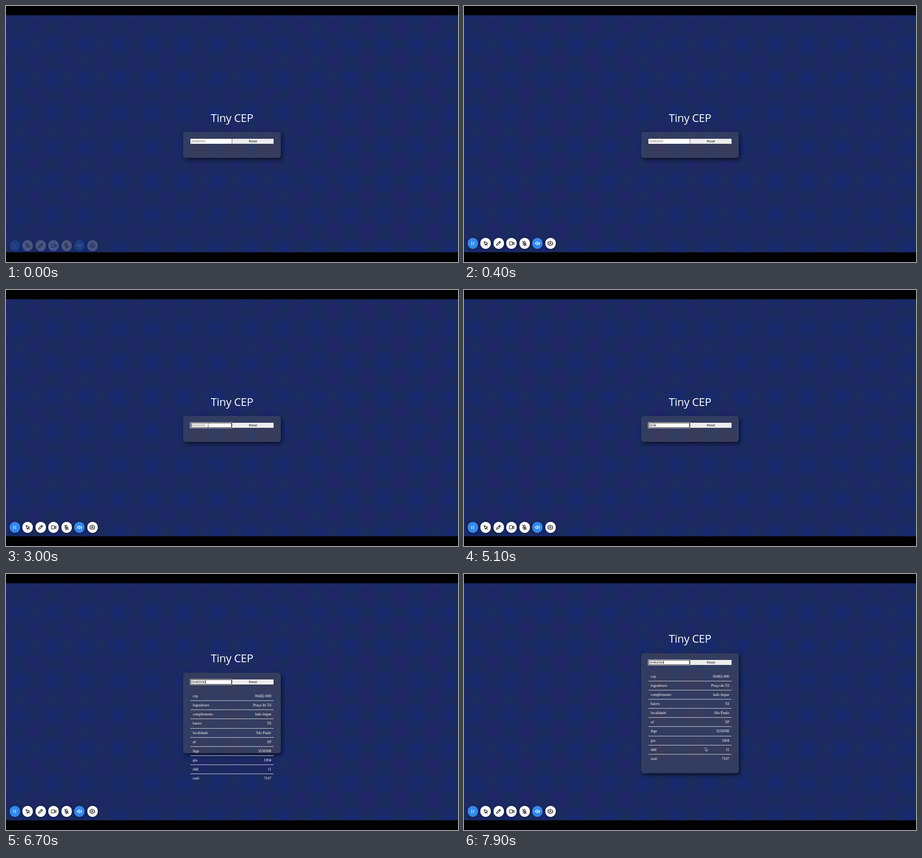
An HTML page that plays this animation: 995 px wide and 563 px high, repeating every 8000 ms.

```html
<!DOCTYPE html>
<html lang="pt">
<head>
<meta charset="utf-8">
<title>Tiny CEP</title>
<style>
  html, body { margin: 0; width: 100%; height: 100%; overflow: hidden; background: #000; }
  div, svg, span { position: absolute; box-sizing: border-box; }
  #stage { left: 0; top: 0; width: 995px; height: 563px; overflow: hidden; }
  #wall {
    inset: 0; clip-path: inset(20.5px 0 21.5px);
    background:
      radial-gradient(closest-side, #20246a, #20246a00) 28.5px 7.5px / 73px 75px,
      radial-gradient(closest-side, #172872, #17287200) -8.5px 47.5px / 73px 75px,
      #1b2d59;
  }
  #card {
    left: 390px; width: 215px; border-radius: 6px;
    background:
      radial-gradient(closest-side, #50374659, #50374600) 28.5px -22.5px / 73px 75px fixed,
      #313d62;
    box-shadow: 3px 4px 8px #0009;
  }
  #title {
    left: 0; width: 100%; top: -46.5px; text-align: center; color: #fff; white-space: nowrap;
    font: 24.3px/30px "Open Sans", sans-serif; letter-spacing: -.4px;
  }
  #field, #reset { top: 15px; height: 11px; font: 6.95px/11px "Liberation Sans", Arial, sans-serif; }
  #field { left: 16px; width: 91px; background: #fff; white-space: nowrap; }
  #field.focus { box-shadow: inset 0 0 0 1px #101010, 0 0 0 1px #e8e8f0; }
  #text { left: 1.8px; top: 0; }
  #caret { top: 2px; width: 1px; height: 7px; background: #222; }
  #reset {
    left: 107px; width: 92px; background: #ededee; color: #111; text-align: center;
    border-left: 1px solid #6d6d74;
  }
  .row {
    left: 16px; width: 183px; height: 20.15px; padding: 0 5px; color: #fff;
    border-bottom: 1px solid #d5d8e2; font: 8.3px/19.6px "Liberation Serif", Times, serif;
    display: flex; justify-content: space-between;
  }
  .row:last-child { border: 0; }
  .row span { position: static; }
  .tool { top: 510.4px; width: 23.4px; height: 23.4px; border-radius: 50%; background: #fff; box-shadow: 0 1px 6px #0006; }
  .tool.on { background: #3388ea; }
  .tool svg { left: 5.7px; top: 5.7px; width: 12px; height: 12px; }
  .tool path { fill: none; stroke: #111; stroke-width: 2.2; stroke-linejoin: round; stroke-linecap: round; }
  .tool.on path { stroke: #fff; }
  #bar { inset: 0; }
  #arrow, #beam { left: 0; top: 0; overflow: visible; }
</style>
</head>
<body>
<div id="stage">
  <div id="wall"></div>
  <div id="card">
    <div id="title">Tiny CEP</div>
    <div id="field"><span id="text"></span><div id="caret"></div></div>
    <div id="reset">Reset</div>
    <div id="rows"></div>
  </div>
  <div id="bar"></div>
  <svg id="arrow" width="8" height="12"><path d="M0 0V8L1.9 6.4L3.2 9.2L4.4 8.7L3.1 5.9H5.6Z" fill="#1b2140" stroke="#e4e6ee" stroke-width=".8"/></svg>
  <svg id="beam" width="6" height="10"><path d="M-1.5 -4H1.5M0 -4V4M-1.5 4H1.5" fill="none" stroke="#333" stroke-width=".8"/></svg>
</div>
<script>
const $ = id => document.getElementById(id);
const LOOP = 8000, STEP = 100;
const CODE = '00482000';
const KEY_TIMES = [4000, 4100, 4400, 4600, 5200, 5600, 5800, 6400];
const CARET_OFF = [[2500, 3000], [3600, 4000], [5100, 5200], [6300, 6400], [7000, 7500]];
const DIGIT = 6.95 * .556;

// Keyframes: [time, ...values]
const GROWTH = [[6400, 0], [6500, .06], [6600, .27], [6700, .58], [6999, .58], [7000, 1]];
const ENTER = [[1100, 522, 470], [1200, 498, 415], [1300, 478, 368], [1400, 463, 337.5],
               [1500, 453, 314], [1600, 447, 301], [1700, 445, 296.5]];
const RETURN = [[7800, 538, 394], [7900, 531, 381]];

const DATA = [
  ['cep', '00482-000'], ['logradouro', 'Praça do Til'], ['complemento', 'lado ímpar'],
  ['bairro', 'Til'], ['localidade', 'São Paulo'], ['uf', 'SP'], ['ibge', '3550308'],
  ['gia', '1004'], ['ddd', '11'], ['siafi', '7107']
];
$('rows').innerHTML = DATA.map(([key, value], i) =>
  `<div class="row" style="top:${42 + i * 20.15}px"><span>${key}</span><span>${value}</span></div>`).join('');

const ICONS = [
  'M8 5V19M16 5V19',
  'M4 4L10 21L13 14L20 11ZM13 14L20 21',
  'M3 21L4 16L17 3L21 7L8 20ZM14 6L18 10',
  'M2 5H15V19H2ZM15 11L22 7V17L15 13',
  'M9 5Q9 2 12 2T15 5V11Q15 14 12 14T9 11ZM5 11Q5 18 12 18T19 11M12 18V22M8 22H16M3 3L21 21',
  'M2 9H6L11 5V19L6 15H2ZM15 9Q18 12 15 15M18 5Q24 12 18 19',
  'M10 2H14L15 5L18 6L21 6L23 10L20 12L23 15L21 19L17 18L15 20L14 22H10L9 19L6 18L3 19L1 15L4 12L1 9L3 5L7 6L9 5ZM12 9A3 3 0 1 1 11.9 9'
];
$('bar').innerHTML = ICONS.map((d, i) =>
  `<div class="tool ${i === 0 || i === 5 ? 'on' : ''}" style="left:${7.6 + i * 28.5}px">
    <svg viewBox="0 0 24 24"><path d="${d}"/></svg></div>`).join('');

function sample(keys, t) {
  const next = keys.findIndex(k => k[0] > t);
  if (next === 0) return keys[0].slice(1);
  if (next < 0) return keys[keys.length - 1].slice(1);
  const a = keys[next - 1], b = keys[next], p = (t - a[0]) / (b[0] - a[0]);
  return a.slice(1).map((v, i) => v + (b[i + 1] - v) * p);
}

const show = (id, visible) => $(id).style.display = visible ? '' : 'none';

function draw(t) {
  const fade = Math.min(1, t / 400);
  $('bar').style.opacity = .2 + .8 * fade;
  $('bar').style.transform = `translateY(${5 * (1 - fade)}px)`;

  const grown = 207 * sample(GROWTH, t)[0];
  $('card').style.top = 277 - grown / 2 + 'px';
  $('card').style.height = 57.3 + grown + 'px';
  show('rows', t >= 6500);

  const typed = KEY_TIMES.filter(k => k <= t).length;
  $('text').textContent = typed ? CODE.slice(0, typed) : CODE;
  $('text').style.color = typed ? '#111' : '#757575';
  $('field').className = t >= 2000 ? 'focus' : '';
  $('caret').style.left = 1.8 + typed * DIGIT + 'px';
  show('caret', t >= 2000 && !CARET_OFF.some(([from, to]) => t >= from && t < to));

  const [x, y] = sample(t < 7800 ? ENTER : RETURN, t);
  const overField = y < 303;
  $('arrow').style.transform = $('beam').style.transform = `translate(${x}px, ${y}px)`;
  show('arrow', t >= 7800 || (t >= 1100 && !overField));
  show('beam', t >= 1100 && t < 4000 && overField);
}

function frame() {
  draw(Math.floor(performance.now() % LOOP / STEP) * STEP);
  requestAnimationFrame(frame);
}
frame();
</script>
</body>
</html>
```
